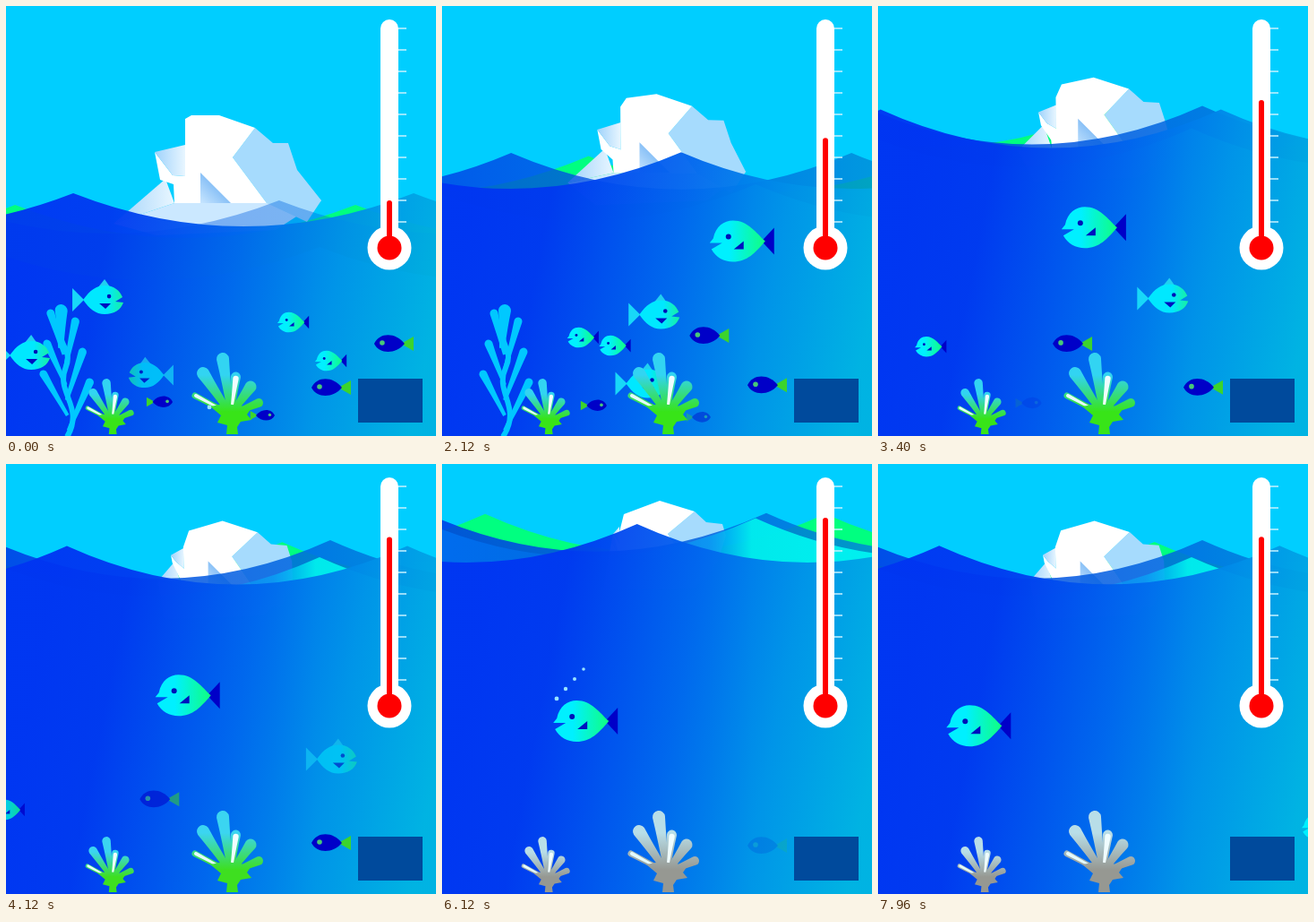
Write an HTML page that moves like this. It is 480 px wide and 480 px high and loops after 8000 ms.

```html
<!DOCTYPE html>
<html lang="en">
<head>
<meta charset="utf-8">
<title>Warming sea</title>
<style>
html, body { margin: 0; width: 100%; height: 100%; overflow: hidden; background: #00ceff; }
svg { display: block; width: 100vw; height: 100vh; }
</style>
</head>
<body>
<svg viewBox="0 0 480 480">
  <defs>
    <linearGradient id="water" gradientUnits="userSpaceOnUse" x1="20" y1="300" x2="470" y2="388">
      <stop offset="0" stop-color="#0034f2"/><stop offset=".18" stop-color="#0038f0"/>
      <stop offset=".5" stop-color="#0066ee"/><stop offset=".75" stop-color="#0090e8"/>
      <stop offset="1" stop-color="#00b0e2"/>
    </linearGradient>
    <linearGradient id="back" gradientUnits="userSpaceOnUse" x1="0" y1="0" x2="480" y2="0">
      <stop offset="0" stop-color="#0038e4"/><stop offset=".7" stop-color="#0068e0"/>
      <stop offset="1" stop-color="#0088d6"/>
    </linearGradient>
    <linearGradient id="swell" gradientUnits="userSpaceOnUse" x1="0" y1="0" x2="480" y2="0">
      <stop offset="0" stop-color="#006cee"/><stop offset=".35" stop-color="#0078f0" stop-opacity=".4"/>
      <stop offset=".62" stop-color="#00b8ff" stop-opacity=".5"/>
      <stop offset=".72" stop-color="#00f2ee" stop-opacity=".92"/><stop offset="1" stop-color="#00f0f0"/>
    </linearGradient>
    <linearGradient id="skin"><stop offset=".35" stop-color="#00f0ff"/><stop offset="1" stop-color="#10ff80"/></linearGradient>
    <linearGradient id="skin2"><stop offset=".6" stop-color="#00e8ff"/><stop offset="1" stop-color="#18f0a0"/></linearGradient>
    <linearGradient id="facet"><stop offset="0" stop-color="#9fd2fb"/><stop offset="1" stop-color="#e8f6ff"/></linearGradient>
    <linearGradient id="notch" x1="0" y1="1" x2="1" y2="0"><stop offset="0" stop-color="#c8e6ff"/><stop offset="1" stop-color="#4c9cee"/></linearGradient>
    <linearGradient id="polyp" gradientUnits="userSpaceOnUse" x1="0" y1="-85" x2="0" y2="-10">
      <stop id="tipStop" offset=".25"/><stop id="footStop" offset=".8"/>
    </linearGradient>
    <g id="big">
      <path d="M58 0 72 -15V15Z" fill="#0000c8"/>
      <path d="M4-3C7-17 16-23 26-23C43-23 52-9 62 0C51 13 42 23 26 23C16 23 7 18 2 9L14 2H0Z" fill="url(#skin)"/>
      <circle cx="21" cy="-5" r="3" fill="#0010b8"/><path d="M27 9 38 0V9Z" fill="#0010c0"/>
    </g>
    <g id="finned">
      <path d="M0-13 13 0 0 13Z" fill="#18d8f8"/>
      <path d="M28-13 36-23 43-13Z" fill="#20d0f0"/>
      <path d="M12 0C20-11 27-16 36-16C47-16 53-10 56-3L48 2 57 3C54 11 47 16 36 16C26 16 19 10 12 0Z" fill="url(#skin2)"/>
      <circle cx="41" cy="-4" r="2.300" fill="#0010b8"/><path d="M30 4H43L37 10Z" fill="#0010c0"/>
    </g>
    <g id="navy">
      <path d="M30 0 44-8V8Z" fill="#3cd42c"/>
      <path d="M0 0C6-13 24-13 34 0C24 12 6 12 0 0Z" fill="#0000c8"/>
      <circle cx="9" cy="-1" r="2.800" fill="#48c878"/>
    </g>
    <g id="coral"></g>
  </defs>
  <rect width="480" height="480" fill="#00ceff"/>
  <path id="green" fill="#00ff80"/>
  <g id="ice"></g>
  <path id="rear" fill="url(#back)"/>
  <path id="mid" fill="url(#swell)"/>
  <path id="front" fill="url(#water)" opacity=".95"/>
  <g id="weed" fill="#00c8ff">
    <path d="M68 481C90 447 58 432 71 404C80 385 66 380 67 362" fill="none" stroke="#00c8ff" stroke-width="6"/>
  </g>
  <g id="shoal"></g>
  <use href="#coral" transform="translate(250 478)"/>
  <use href="#coral" transform="translate(117.500 478) scale(.68)"/>
  <g id="bubbles" fill="#98e4ff"></g>
  <path id="ticks" stroke="#c8f2ff" stroke-width="1.500"/>
  <rect x="418" y="15" width="20" height="250" rx="10" fill="#fff"/>
  <circle cx="428" cy="270" r="24.500" fill="#fff"/>
  <circle cx="428" cy="270" r="13.500" fill="#f00"/>
  <rect id="mercury" x="425" width="6" rx="3" fill="#f00"/>
  <rect x="393" y="416" width="72" height="49" fill="#004a9c"/>
</svg>
<script>
const LOOP = 8000, { sin, cos, exp, min, max, abs, PI } = Math;
const $ = id => document.getElementById(id);
const ramp = (t, a, b) => min(1, max(0, (t - a) / (b - a)));
const lerp = (a, b, k) => a + (b - a) * k;
const mix = (a, b, k) => `rgb(${a.map((v, i) => Math.round(lerp(v, b[i], k)))})`;
const turn = (t, period) => 2 * PI * t / period;

function add(id, tag, attrs) {
  const el = document.createElementNS('http://www.w3.org/2000/svg', tag);
  for (const k in attrs) el.setAttribute(k, attrs[k]);
  return $(id).appendChild(el);
}

// The sea rises, rests, then runs backwards.
const CREST = 5776, TURN = 6310;
const sea = t => t < TURN ? min(t, CREST) : CREST - (t - TURN);

function level(s) {
  const u = ramp(s, 0, 5600);
  return 209 - 142 * u * u * (3 - 2 * u);
}

// Crest position of each layer; y is relative to the level.
const waves = {
  green: s => [10 + .0724 * s, 13 - .0042 * s],
  rear: s => [323 * (1 - ramp(s, 0, 3400)) ** 1.25 - 18, 8 - .0035 * s],
  mid: s => [350, 60 - .0115 * s],
  front: s => [75 + .0905 * s, 0]
};

function drawWave(id, s) {
  const [x, dy] = waves[id](s), y = level(s) + dy, gap = 380;
  const dip = y + 2 * (37 + 6 * ramp(s, 0, 3400));
  let px = x - gap * Math.ceil(x / gap), d = `M${px} ${y}`;
  for (; px < 480; px += gap) d += `Q${px + gap / 2} ${dip} ${px + gap} ${y}`;
  $(id).setAttribute('d', d + 'V480H-400Z');
}

// Iceberg corners when whole and when melted: white face, right side, left corner, left foot.
const whole = [[207,122], [238,122], [278,136], [253,169], [291,220], [188,220], [200,190], [200,126],
  [298,153], [315,153], [325,183], [352,217], [166,163], [120,243]];
const melted = [[203,56], [243,41], [282,53], [252,78], [272,108], [200,105], [198,88], [197,80],
  [295,65], [313,67], [317,80], [308,108], [191,78], [189,87]];
const faces = ['#cbe8ff', '#a6dbfd', 'url(#facet)', '#fff', 'url(#facet)', '#fff', 'url(#notch)']
  .map(fill => add('ice', 'polygon', { fill }));

function drawIce(s) {
  const u = ramp(s, 0, 4800), k = .65 * u + .35 * u ** 5, left = 1 - k;
  const p = whole.map(([x, y], i) => [lerp(x, melted[i][0], k), lerp(y, melted[i][1], k)]);
  const off = (i, x, y) => [p[i][0] + x, p[i][1] + y];
  const n = 34 * min(1, 3 * left), knee = off(5, -1, -21 * left);
  [
    [p[13], p[5], p[4], p[11], off(4, 10, 30), off(5, -20, 36)],
    [p[2], p[8], p[9], p[10], p[11], off(11, -16, 24), p[4], p[3]],
    [p[13], off(12, 12 * left, 30 * left), p[5]],
    [p[12], off(12, 20 * left, 26 * left), p[6], off(5, 12, 0), p[5], knee, off(12, 6 * left, 31 * left)],
    [p[12], [p[6][0], p[12][1] - 8], p[6], off(12, 20 * left, 26 * left)],
    p.slice(0, 8),
    [off(5, 29, -n), off(5, 29 + n, 0), off(5, 29, 0)]
  ].forEach((pts, i) => faces[i].setAttribute('points', pts.join(' ')));
}

const shoal = [];
function fish(shape, scale, flip, x, y, from = 9000, to = 9900) {
  const el = add('shoal', 'use', { href: '#' + shape });
  shoal.push(t => {
    el.setAttribute('transform', `translate(${x(t)} ${y(t)}) scale(${scale * flip} ${scale})`);
    el.setAttribute('opacity', 1 - ramp(t, from, to));
  });
}
const line = (start, speed = 0) => t => start + speed * t;

fish('finned', .88, -1, line(187, -.045), line(412), -200, 500);
fish('finned', 1, 1, line(74, .0633), t => 337 + 11 * sin(turn(t - 600, 4000)), 3800, 4500);
fish('finned', 1, 1, line(-8, .095), t => 390 + 7e-6 * t * t, 2500, 3100);
fish('big', .49, 1, line(303, -.077), line(353, .008), 4000, 4600);
fish('big', .49, 1, line(345, -.08), line(396, -.008), 2500, 3100);
fish('big', 1, 1,
  t => 38 + 476 * exp(-t / 3150) + 9 * (1 + cos(turn(t - 2120, 4000))),
  t => 268 + .0027 * t + 190 * exp(-t / 1900) * cos(turn(t, 7600)));
fish('navy', 1, 1, line(411, -.0635), t => 372 + 5 * cos(turn(t, 3500)), 3800, 4500);
fish('navy', 1, 1, line(341), t => 424 + 2 * cos(turn(t, 3100)), 5300, 6250);
fish('navy', .62, -1, line(300), line(457, .001), 1650, 2450);
fish('navy', .66, -1, line(186, -.001), t => 444 - 2 * cos(turn(t, 4200)), 2700, 3500);
fish('big', .6, 1, t => 473 + .1 * max(0, 7960 - t), line(405));

const bubbles = [];
function burst(t0, x, y, count) {
  for (let i = 0; i < count; i++) {
    const el = add('bubbles', 'circle', { cx: x + 10 * i, r: 2.4 - .2 * i });
    bubbles.push(t => {
      el.setAttribute('cy', y - 11 * i - (t - t0) * .04);
      el.setAttribute('opacity', abs(t - t0) < 350 ? 1 : 0);
    });
  }
}
burst(0, 227, 448, 1);
burst(1200, 131, 339, 1);
burst(1200, 262, 381, 2);
burst(6120, 128, 262, 4);

// A club: narrow at the foot, round at the tip.
function club(id, x0, y0, x, y, r, foot, fill) {
  const len = Math.hypot(x - x0, y - y0), nx = (y - y0) / len, ny = (x0 - x) / len;
  const at = (px, py, w) => `${px + nx * w} ${py + ny * w}`;
  const mx = lerp(x0, x, .55), my = lerp(y0, y, .55), waist = (r + foot) * .45;
  add(id, 'path', { fill, d: `M${at(x0, y0, foot)}Q${at(mx, my, waist)} ${at(x, y, r)}` +
    `A${r} ${r} 0 0 1 ${at(x, y, -r)}Q${at(mx, my, -waist)} ${at(x0, y0, -foot)}Z` });
}

// Seaweed: leaves on alternating sides of the stem.
for (let i = 0; i < 6; i++) {
  const side = i % 2 ? -1 : 1, y = 474 - 17 * i;
  club('weed', 70, y, 70 + side * (27 - 3 * i), y - 50 - 4 * side, 4.5, 2, '#00c8ff');
}
club('weed', 67, 382, 70, 340, 7, 3, '#00c8ff');

const tint = 'url(#polyp)';
const arm = (x, y, r, fill = tint, foot = 3) => club('coral', 1, -22, x, y, r, foot, fill);
arm(-8, -84, 7);
arm(-30, -68, 7);
arm(23, -53, 6.5);
arm(32, -35, 5);
arm(-39, -43, 3.5);
arm(6.5, -64, 5.5);
arm(-38, -43, 2, '#e4fbff', 1);
arm(6.5, -62, 3.2, '#f0fdff', 1);
add('coral', 'path', { fill: tint, d: 'M-22-31-6-34 12-32 23-28 19-22 24-16 12-14 8-8 9 0H-4L-3-10-14-13-10-21Z' });

let marks = '';
for (let y = 25; y < 250; y += 24) marks += `M438 ${y}H447`;
$('ticks').setAttribute('d', marks);

function draw(t) {
  const s = sea(t);
  for (const id in waves) drawWave(id, s);
  $('rear').setAttribute('opacity', lerp(.4, .85, ramp(s, 0, 2600)));
  drawIce(s);
  const top = max(60, 217 - s * .0329);
  $('mercury').setAttribute('y', top);
  $('mercury').setAttribute('height', 270 - top);
  const lean = .06 * (1 - ramp(t, 0, 1200)) ** 2;
  $('weed').setAttribute('transform', `matrix(1 0 ${lean} 1 ${-479 * lean} 0)`);
  $('weed').setAttribute('opacity', 1 - ramp(t, 2400, 3200));
  const pale = ramp(t, 4000, 5880);
  $('tipStop').setAttribute('stop-color', mix([50, 212, 242], [184, 222, 232], pale));
  $('footStop').setAttribute('stop-color', mix([56, 228, 24], [150, 152, 146], pale));
  shoal.forEach(f => f(t));
  bubbles.forEach(b => b(t));
}

const start = performance.now();
function tick() {
  draw((performance.now() - start) % LOOP);
  requestAnimationFrame(tick);
}
tick();
</script>
</body>
</html>
```
